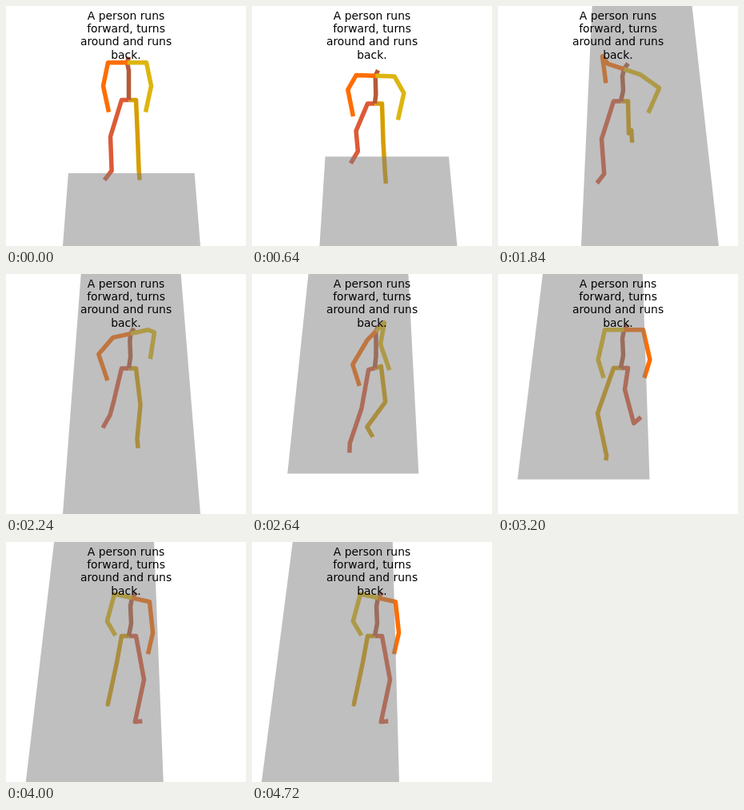
An HTML page for the animation above (4800 ms loop, 300 px wide and 300 px high).

```html
<!DOCTYPE html>
<html lang="en">
<head>
<meta charset="utf-8">
<title>Running figure</title>
<style>
  html, body { margin: 0; width: 100%; height: 100%; overflow: hidden; background: #fff; }
  svg { display: block; width: 100%; height: 100%; }
  polyline { fill: none; stroke-width: 5.5; stroke-linejoin: round; }
  text { font: 13.89px "DejaVu Sans", sans-serif; text-anchor: middle; }
</style>
</head>
<body>
<svg viewBox="0 0 300 300">
  <polyline id="rightLeg" stroke="#dd5a37"/>
  <polyline id="leftLeg" stroke="#d69e00"/>
  <polyline id="spine" stroke="#b75a39"/>
  <polyline id="rightArm" stroke="#ff6d00"/>
  <polyline id="leftArm" stroke="#ddb50e"/>
  <polygon id="ground" fill="#808080" fill-opacity=".5"/>
  <text x="150" y="17">A person runs</text>
  <text x="150" y="33">forward, turns</text>
  <text x="150" y="49">around and runs</text>
  <text x="150" y="66">back.</text>
</svg>
<script>
const LOOP = 4800, STEP = 80;
const { sin, cos, PI, floor } = Math;
const rad = deg => deg * PI / 180;

// [time, value] key points of the few things that steer the run.
const keys = {
  run: [[0, 0], [400, .2], [1200, 1], [1840, 1], [2640, .4], [3200, 1]],
  cycle: [[0, -2.5], [1840, 2.93], [2640, 5], [3200, 6.5], [4000, 9.25], [4720, 11.25]],
  lean: [[0, 0], [1200, 30], [1840, 12], [2640, 2]],
  tuck: [[0, 0], [1840, 1], [2640, .2]],
  sway: [[0, -6], [1840, -7], [2640, 2], [3200, -12], [4000, 2]],
  floorX: [[0, 71], [1200, 95], [1880, 104], [2240, 71], [2640, 39], [3200, 19],
    [3920, 25], [4720, 12]],
  depth: [[0, 9.95], [560, 10.11], [1200, 10.98], [1680, 12.48], [2240, 13.1],
    [2720, 13.59], [3200, 13.5], [3920, 13.14], [4720, 12.7]]
};

const slope = (a, b) => (b[1] - a[1]) / (b[0] - a[0]);
const mean = (m, n) => m * n > 0 ? 2 * m * n / (m + n) : 0;
const smooth = u => u * u * (3 - 2 * u);

// Smooth curve through the key points without overshoot.
function at(name, t) {
  const k = keys[name], n = k.length - 1;
  if (t >= k[n][0]) return k[n][1];
  let i = 0;
  while (t >= k[i + 1][0]) i++;
  const a = k[i], b = k[i + 1], h = b[0] - a[0], u = (t - a[0]) / h;
  const m = slope(a, b);
  const m0 = i ? mean(slope(k[i - 1], a), m) : m;
  const m1 = i + 1 < n ? mean(m, slope(b, k[i + 2])) : m;
  return a[1] + (b[1] - a[1]) * smooth(u)
    + h * (m0 * u * (1 - u) ** 2 - m1 * u * u * (1 - u));
}

// Heading in degrees: 0 faces the viewer, 180 faces away.
const heading = t => 180 * smooth(Math.min(1, Math.max(0, (t - 2450) / 750)));

// Step from a joint: forward, down and to the body's left, seen from 30 degrees above.
function move([x, y], yaw, forward, down, left) {
  const near = forward * cos(yaw) - left * sin(yaw);
  return [x + forward * sin(yaw) + left * cos(yaw), y + .866 * down + .5 * near];
}
const bone = (from, yaw, length, deg, left) =>
  move(from, yaw, length * sin(rad(deg)), length * cos(rad(deg)), left);
const shift = ([x, y], dx) => [x + dx, y];

const set = (id, points) =>
  document.getElementById(id).setAttribute("points",
    points.map(p => p.map(v => v.toFixed(2)).join()).join(" "));

// side is 1 for the left and -1 for the right.
function leg(s, side) {
  const phase = s.phase(side), yaw = s.yaw;
  const swing = -8 * cos(yaw) - s.lean / 4 + 25 * s.run * sin(phase);
  const shin = swing - 24 * s.run * (1 + cos(phase));
  const hip = move(s.pelvis, yaw, 0, 0, 9 * side);
  const knee = shift(bone(hip, yaw, 58, swing, 8 * side), s.sway);
  const ankle = shift(bone(knee, yaw, 54, shin, 0), -1.6 * s.sway - 8);
  const toe = shift(bone(ankle, yaw, 16, shin + 80, 5 * side), -4 * cos(yaw));
  return [s.pelvis, hip, knee, ankle, toe];
}

function arm(s, side) {
  const yaw = s.chestYaw + s.twist / 2;
  const swing = -10 - 45 * s.tuck + 17 * s.run * cos(s.phase(side));
  const shoulder = move(s.neck, s.chestYaw + s.twist, 0, 0, 24 * side);
  const elbow = bone(shoulder, yaw, 38, swing, (6 + 12 * s.tuck) * side);
  const wrist = bone(elbow, yaw, 34, swing + 25 + 60 * s.tuck, -7 * side);
  return [s.neck, shoulder, elbow, wrist];
}

function drawBody(t) {
  const s = { yaw: rad(heading(t)), chestYaw: rad(heading(t + 150)) };
  for (const name of ["run", "lean", "tuck", "sway"]) s[name] = at(name, t);
  const cycle = at("cycle", t) * PI;
  s.phase = side => side < 0 ? cycle : cycle + PI;
  s.twist = rad(34) * s.run * cos(cycle);
  s.pelvis = [153.5, 117.5 + s.lean ** 2 / 90];

  const up = (part, dx) => shift(bone(s.pelvis, s.yaw, -54 * part, -s.lean, 0), dx);
  s.neck = up(1, 6 * s.run - 2);
  const head = [s.neck[0] + 2 + 3 * s.run, s.neck[1] - 7];
  set("spine", [s.pelvis, up(.33, 3 * s.run), up(.78, 2 * s.run), s.neck, head]);
  set("rightLeg", leg(s, -1));
  set("leftLeg", leg(s, 1));
  set("rightArm", arm(s, -1));
  set("leftArm", arm(s, 1));
}

// The floor's sides meet at the vanishing point (154, -796).
function drawGround(t) {
  const x = at("floorX", t), depth = at("depth", t);
  const point = (x, d) => [154 + (x - 154) * 1e4 / d / 1096, 1e4 / d - 796];
  set("ground", [point(x, depth), point(x + 172, depth),
    point(x + 172, depth - 4), point(x, depth - 4)]);
}

const start = performance.now();
function tick() {
  const t = floor((performance.now() - start) % LOOP / STEP) * STEP;
  drawBody(t);
  drawGround(t);
  requestAnimationFrame(tick);
}
tick();
</script>
</body>
</html>
```
